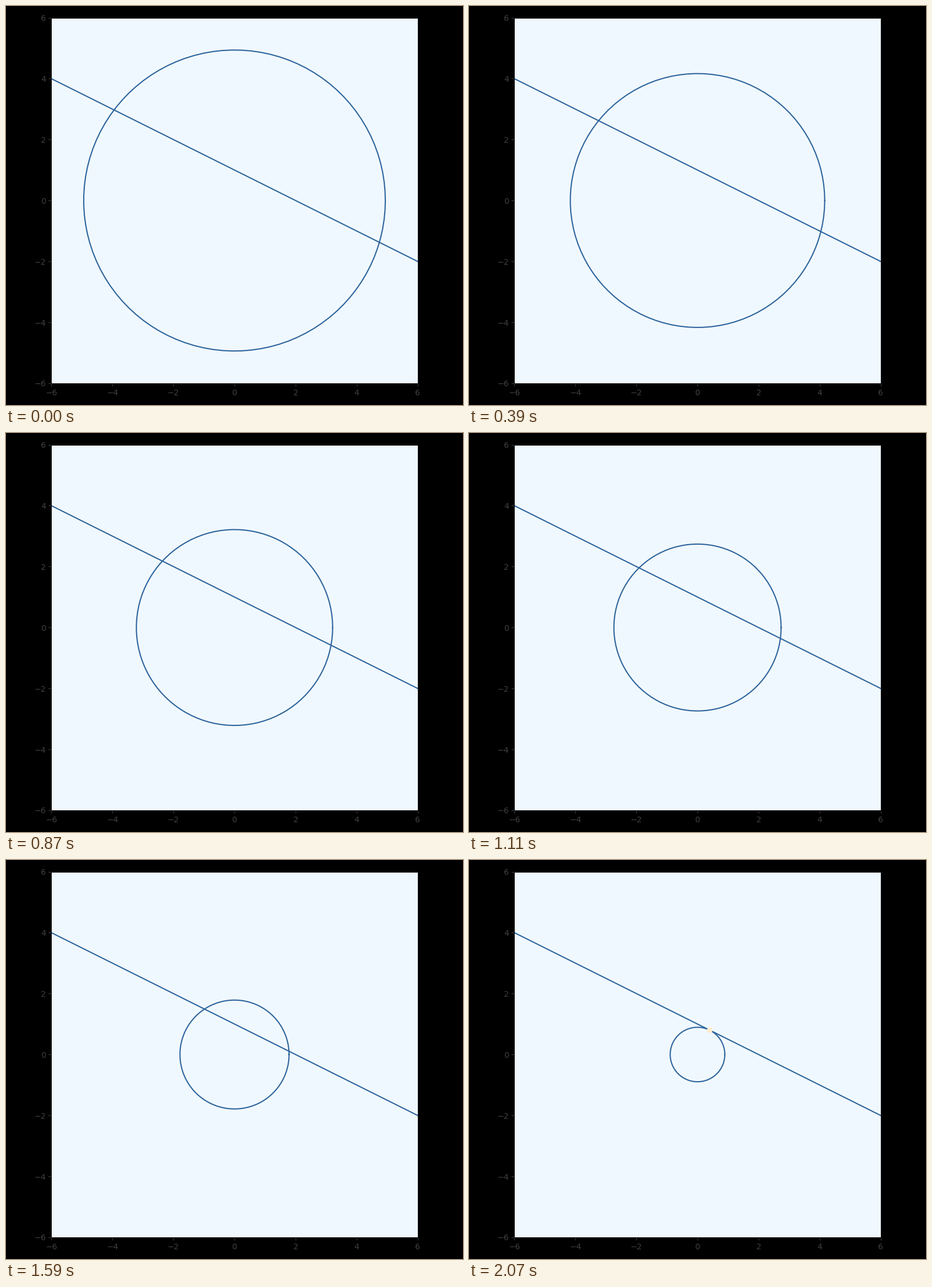
A matplotlib script that plays this animation: 800x700 px, repeating every 2940 ms.

```python
import numpy as np
import matplotlib.pyplot as plt
from matplotlib.animation import FuncAnimation

W, H, DPI = 800, 700, 100
SIDE = 641.3                 # axes side in pixels
CX, CY = 400, H - 341.25     # axes centre, measured from the bottom left
FRAMES, INTERVAL = 98, 30
STEPS = 69                   # steps the circle needs to touch the line
BLUE, GREY = "#2c649c", "#404040"

R_START, R_TOUCH = 5, 2 / np.sqrt(5)

fig = plt.figure(figsize=(W / DPI, H / DPI), dpi=DPI, facecolor="black")
ax = fig.add_axes([(CX - SIDE / 2) / W, (CY - SIDE / 2) / H, SIDE / W, SIDE / H],
                  facecolor="aliceblue")
ax.set(xlim=(-6, 6), ylim=(-6, 6),
       xticks=range(-6, 7, 2), yticks=range(-6, 7, 2))
ax.tick_params(colors=GREY)

theta = np.linspace(0, 2 * np.pi, 100)
cos, sin = np.cos(theta), np.sin(theta)

x = np.array([-6, 6])
ax.plot(x, 1 - x / 2, color=BLUE, lw=1.5)
circle, = ax.plot([], [], color=BLUE, lw=1.5)
contact, = ax.plot([0.4], [0.8], "o", color="blanchedalmond", ms=6, zorder=3)


def update(i):
    progress = min(i + 1, STEPS) / STEPS
    r = R_START + (R_TOUCH - R_START) * progress
    circle.set_data(r * cos, r * sin)
    contact.set_visible(i >= STEPS)
    return circle, contact


anim = FuncAnimation(fig, update, frames=FRAMES, interval=INTERVAL,
                     repeat=True, repeat_delay=0)
plt.show()
```
